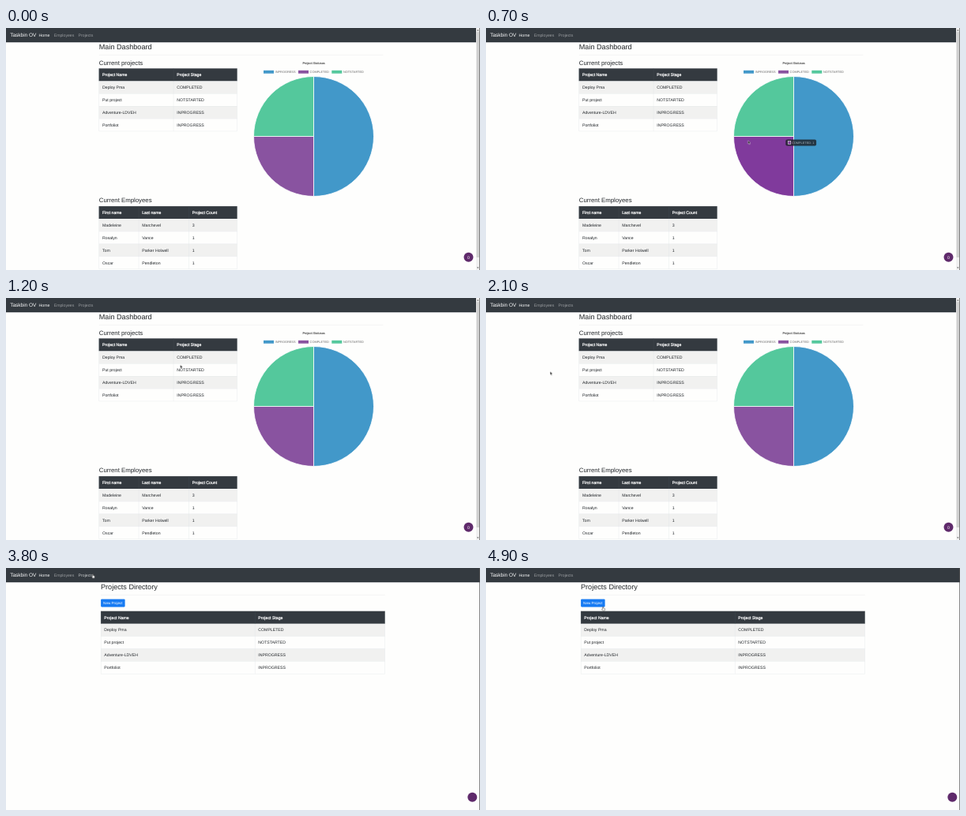
Write an HTML page that moves like this. It is 600 by 307 pixels and loops after 5000 ms.

```html
<!DOCTYPE html>
<html lang="en">
<head>
<meta charset="utf-8">
<title>Dashboard</title>
<style>
html, body { margin: 0; width: 100%; height: 100%; overflow: hidden; background: #fefefd; }
svg { display: block; width: 600px; height: 307px; }
text { font-family: "Liberation Sans", Arial, sans-serif; font-size: 5.2px; fill: #212529; text-rendering: geometricPrecision; white-space: pre; }
.h3 { font-size: 9.1px; }
.h4 { font-size: 7.8px; }
.brand { font-size: 6.5px; fill: #fff; }
.white { fill: #fff; }
.link { fill: #fff; fill-opacity: .5; }
.th { fill: #fff; stroke: #fff; stroke-width: .22px; }
.small { font-size: 3.9px; fill: #666; }
.bold { stroke: #666; stroke-width: .18px; }
.btn { font-size: 4.55px; fill: #fff; }
.tip { font-size: 3.9px; fill: #fff; fill-opacity: .6; }

/* 1% of the loop is 50 ms */
.anim { animation: 5s step-end infinite; }
.page1 { animation-name: page1; }
.page2 { animation-name: page2; }
.cursor { animation-name: move; }
.arrow { animation-name: arrow; }
.hand { animation-name: hand; }
.hover { animation-name: hover; }
.blue { fill: #4298c9; animation-name: blue; }
.purple { fill: #8953a0; animation-name: purple; }
.tipA { animation-name: tipA; }
.tipB { animation-name: tipB; }

@keyframes page1 { 0% { visibility: visible } 76%, 100% { visibility: hidden } }
@keyframes page2 { 0% { visibility: hidden } 76%, 100% { visibility: visible } }
@keyframes hover { 0% { fill-opacity: .5 } 52% { fill-opacity: .75 } 88%, 100% { fill-opacity: .5 } }
@keyframes blue { 0% { fill: #4298c9 } 10% { fill: #2788c6 } 14%, 100% { fill: #4298c9 } }
@keyframes purple { 0% { fill: #8953a0 } 14% { fill: #803a9c } 16%, 100% { fill: #8953a0 } }
@keyframes tipA { 0% { opacity: 0 } 12% { opacity: 1 } 14%, 100% { opacity: 0 } }
@keyframes tipB { 0% { opacity: 0 } 14% { opacity: 1 } 16%, 100% { opacity: 0 } }
@keyframes arrow { 0% { opacity: 0 } 10% { opacity: 1 } 52% { opacity: 0 } 88% { opacity: 1 } 98%, 100% { opacity: 0 } }
@keyframes hand { 0% { opacity: 0 } 52% { opacity: 1 } 88% { opacity: 0 } 98%, 100% { opacity: 1 } }
@keyframes move {
  0%, 10% { transform: translate(452px, 186px) }
  12% { transform: translate(394px, 160px) }
  14% { transform: translate(331.7px, 142.7px) }
  16% { transform: translate(285px, 122px) }
  18% { transform: translate(254px, 105px) }
  20% { transform: translate(236px, 95px) }
  22% { transform: translate(227px, 89px) }
  24% { transform: translate(220.6px, 84.8px) }
  26% { transform: translate(180px, 86px) }
  28% { transform: translate(118px, 91px) }
  30%, 42% { transform: translate(81.2px, 93.2px) }
  44% { transform: translate(70px, 86px) }
  46% { transform: translate(55px, 64px) }
  48% { transform: translate(61px, 42px) }
  50% { transform: translate(77px, 22px) }
  52% { transform: translate(94px, 10px) }
  54% { transform: translate(105px, 8px) }
  56% { transform: translate(109.9px, 7.6px) }
  88% { transform: translate(135px, 20px) }
  90% { transform: translate(190px, 45px) }
  92% { transform: translate(235px, 69px) }
  94% { transform: translate(215px, 66px) }
  96% { transform: translate(175px, 57px) }
  98%, 100% { transform: translate(148.1px, 48.9px) }
}
</style>
</head>
<body>
<svg id="stage" viewBox="0 0 600 307"></svg>
<script>
const ROW = 15.9;
const text = (x, y, s, cls = '', extra = '') => `<text x="${x}" y="${y}" class="${cls}" ${extra}>${s}</text>`;
const rect = (x, y, w, h, fill, extra = '') =>
  `<rect x="${x}" y="${y}" width="${w}" height="${h}" fill="${fill}" ${extra}/>`;

// edges: left side of each column, then the right side of the table
function table(y, edges, rows) {
  const left = edges[0], width = edges[edges.length - 1] - left;
  const bottom = ROW * rows.length;
  let out = '';
  rows.forEach((cells, i) => {
    const top = y + i * ROW;
    if (i % 2) out += rect(left, top, width, ROW, '#f1f1f0');
    if (i) out += rect(left, top, width, .33, '#dee2e6');
  });
  out += rect(left, y + bottom, width, .33, '#dee2e6');
  edges.forEach(x => out += rect(x - .16, y, .33, bottom, '#dee2e6'));
  out += rect(left, y, width, ROW, '#343a40');
  edges.forEach(x => out += rect(x - .16, y, .33, ROW, '#454d55'));
  rows.forEach((cells, i) => cells.forEach((s, c) =>
    out += text(edges[c] + 4.2, y + i * ROW + 9.8, s, i ? '' : 'th')));
  return out;
}

function slice(from, to, cls, fill) {
  const point = a => `${389.5 + 76 * Math.sin(a * Math.PI / 2)} ${137.5 - 76 * Math.cos(a * Math.PI / 2)}`;
  return `<path class="${cls}" fill="${fill}" stroke="#fff" stroke-width=".8"
    d="M389.5 137.5L${point(from)}A76 76 0 0 1 ${point(to)}Z"/>`;
}

const tooltip = (x, y, w, color, s, cls) => `<g class="anim ${cls}">
  ${rect(x, y, w, 8, '#1d2228', 'rx="2" fill-opacity=".82"')}
  ${rect(x + 2.9, y + 2.2, 3.6, 3.6, color, 'stroke="#fff" stroke-width=".5"')}
  ${text(x + 7.6, y + 5.4, s, 'tip')}</g>`;

const legend = [[326, '#4298c9', 'INPROGRESS'], [370, '#8953a0', 'COMPLETED'], [412.3, '#54c89c', 'NOTSTARTED']]
  .map(([x, color, s]) => rect(x, 53.8, 13, 3.9, color) + text(x + 14.6, 57.1, s, 'small')).join('');

const projects = [
  ['Project Name', 'Project Stage'],
  ['Deploy Pma', 'COMPLETED'],
  ['Put project', 'NOTSTARTED'],
  ['Adventure-LDVEH', 'INPROGRESS'],
  ['Portfoliot', 'INPROGRESS']
];
const employees = [
  ['First name', 'Last name', 'Project Count'],
  ['Madeleine', 'Marchevel', '3'],
  ['Rosalyn', 'Vance', '1'],
  ['Tom', 'Parker Holwell', '1'],
  ['Oscar', 'Pendleton', '1']
];

const dashboard = `<g class="anim page1">
  ${rect(0, 0, 595, 18.2, '#343a40')}
  ${text(117.8, 26.5, 'Main Dashboard', 'h3')}
  ${rect(117.8, 33.9, 359.5, .33, '#dcdcdb')}
  ${text(117.8, 46.6, 'Current projects', 'h4')}
  ${table(51.3, [117.8, 212, 292.5], projects)}
  ${text(117.8, 221.1, 'Current Employees', 'h4')}
  ${table(226.1, [117.8, 168, 231.5, 292.5], employees)}
  ${text(389.6, 45.9, 'Project Statuses', 'small bold', 'text-anchor="middle"')}
  ${legend}
  ${slice(0, 2, 'anim blue', '#4298c9')}
  ${slice(2, 3, 'anim purple', '#8953a0')}
  ${slice(3, 4, '', '#54c89c')}
  ${tooltip(428, 133.5, 40.5, '#2788c6', 'INPROGRESS: 2', 'tipA')}
  ${tooltip(379.3, 141.4, 38.8, '#803a9c', 'COMPLETED: 1', 'tipB')}
  ${rect(595, 0, 5, 307, '#f1f1f1')}
  ${rect(595.6, 5, 3.6, 286, '#d0d0d0')}
  <path d="M596 3.4L597.3 1.9 598.6 3.4ZM596 303.6L597.3 305.1 598.6 303.6Z" fill="#555"/>
  <circle cx="585.5" cy="290.8" r="6" fill="#5f2a6b"/>
  ${text(585.5, 292.6, '0', 'white', 'text-anchor="middle"')}
</g>`;

const directory = `<g class="anim page2">
  ${rect(0, 0, 600, 18.2, '#343a40')}
  ${text(120, 26.5, 'Projects Directory', 'h3')}
  ${rect(120, 33.9, 359.7, .33, '#dcdcdb')}
  ${rect(120.1, 39.4, 30.5, 10, '#177bf3', 'rx="1.1"')}
  ${text(123.1, 46, 'New Project', 'btn')}
  ${table(54.7, [120.1, 315.1, 479.6], projects)}
  <circle cx="590.3" cy="290.8" r="6" fill="#5f2a6b"/>
</g>`;

const nav = text(5.2, 11.3, 'Taskbin OV', 'brand')
  + text(41.6, 10.9, 'Home', 'white')
  + text(60.7, 10.9, 'Employees', 'link')
  + text(91.6, 10.9, 'Projects', 'link anim hover');

const cursor = `<g class="anim cursor">
  <path class="anim arrow" d="M0 0V4.2L1 3.4 1.7 5 2.4 4.7 1.7 3.1H3Z" fill="#111" stroke="#fff" stroke-width=".4"/>
  <path class="anim hand" d="M-.5 .3Q0 -.2 .5 .3V2L2.2 2.4Q2.6 2.6 2.5 3.2L2.1 5.2H-.4L-1.6 3.3Q-1.5 2.6 -.5 3.2Z"
    fill="#fff" stroke="#111" stroke-width=".4"/>
</g>`;

document.getElementById('stage').innerHTML =
  dashboard + directory + nav + rect(599.3, 0, .7, 307, '#555') + cursor;
</script>
</body>
</html>
```
